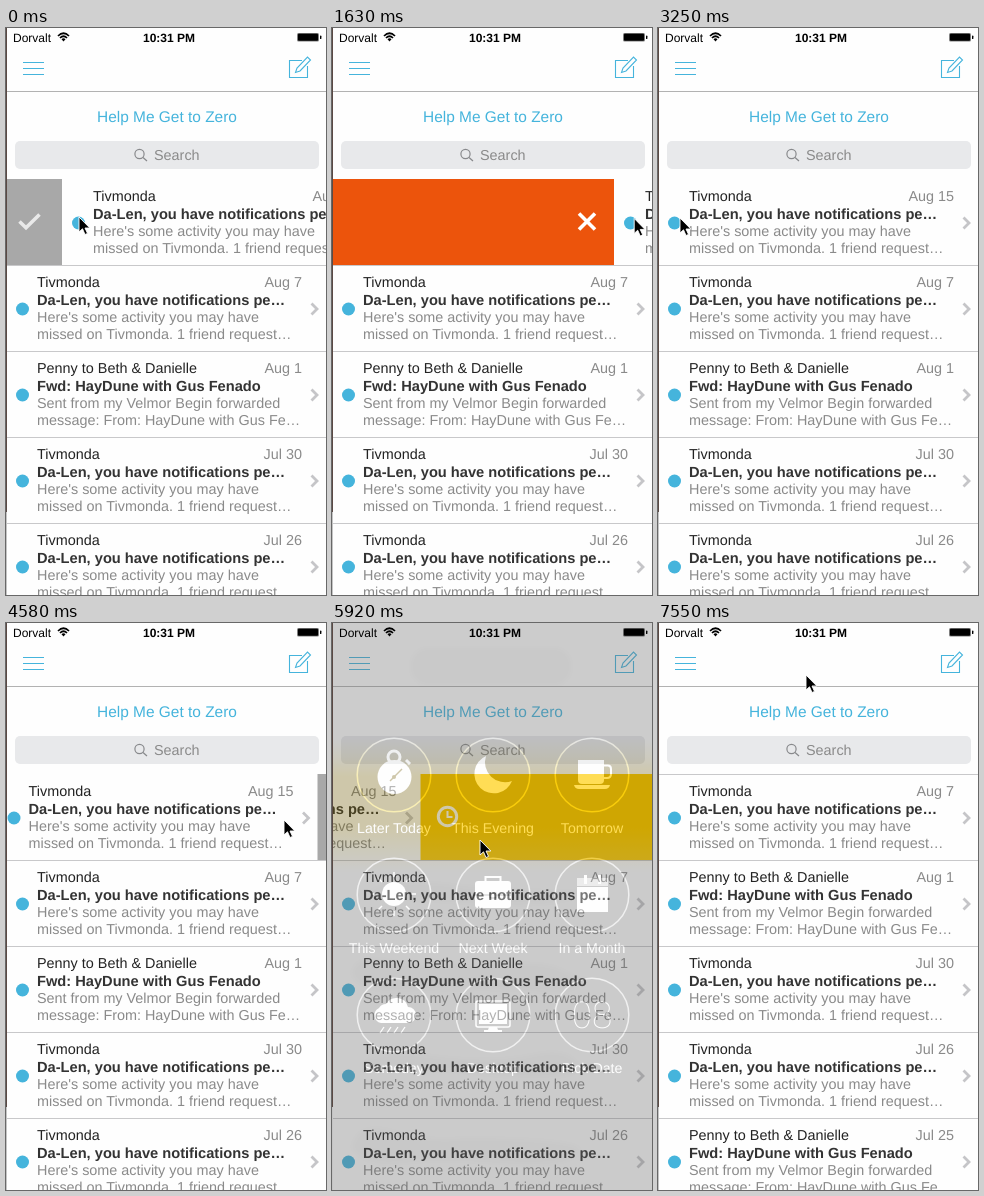
Recreate the animation shown at these times as an HTML page. Size 320 px wide and 567 px high, loop 8000 ms.

```html
<!DOCTYPE html>
<html lang="en">
<head>
<meta charset="utf-8">
<title>Swipe to sort mail</title>
<style>
  html, body { margin: 0; height: 100%; overflow: hidden; background: #fff; }
  svg { display: block; width: 100%; height: 100%; font: 14.4px "Liberation Sans", Arial, sans-serif; text-rendering: geometricPrecision; }
  .line { fill: none; stroke: #45b4dc; stroke-width: 1.1; }
  .subject { font-size: 14.65px; font-weight: bold; fill: #333; }
  .soft { fill: #8a8a8a; }
  .mid { text-anchor: middle; }
  .end { text-anchor: end; }
  .white { fill: none; stroke: #fff; }
  .menu text { font-size: 14.2px; fill: #fff; text-anchor: middle; }
  .menu .digits { font: 100 37px Roboto, sans-serif; }
</style>
</head>
<body>
<svg viewBox="0 0 320 567" preserveAspectRatio="none">
  <defs>
    <linearGradient id="blurredPage" x2="0" y2="1">
      <stop offset=".205" stop-color="#6b6b6b"/>
      <stop offset=".24" stop-color="#6d6640"/>
      <stop offset=".27" stop-color="#725d06"/>
      <stop offset=".36" stop-color="#725d06"/>
      <stop offset=".4" stop-color="#6c6438"/>
      <stop offset=".44" stop-color="#686868"/>
    </linearGradient>
    <linearGradient id="goldRing" gradientUnits="userSpaceOnUse" x1="0" x2="0" y1="115" y2="155">
      <stop stop-color="#e4e4e4"/><stop offset="1" stop-color="#efcf22"/>
    </linearGradient>
    <filter id="blur"><feGaussianBlur stdDeviation="2"/></filter>
  </defs>

  <rect width="320" height="567" fill="#fefefe"/>

  <g id="swipeRow">
    <rect id="panel" y="151" width="320" height="86"/>
    <g id="icon" class="white" stroke-width="3.6">
      <path id="check" d="M-10 0L-3.5 6.2L10-7"/>
      <path id="cross" d="M-8-8L8 8M8-8L-8 8"/>
      <g id="clock" stroke-width="3"><circle r="9.2"/><path d="M0-5.5V.5H5" stroke-width="2"/></g>
    </g>
    <g id="front"></g>
  </g>
  <g id="list"></g>

  <g id="header">
    <path d="M1 63.5H320" stroke="#b2b2b2"/>
    <path class="line" d="M17 34.5H38M17 40.5H38M17 46.5H38"/>
    <path class="line" d="M296 32.5H283.5V49.5H301.5V38M289.5 44.5L291 40L301.5 29L304.5 32L294 43Z"/>
    <text class="mid" x="161" y="94" font-size="15.45" fill="#45b4dc">Help Me Get to Zero</text>
    <rect x="9" y="113" width="304" height="28" rx="5" fill="#e8e9eb"/>
    <g fill="none" stroke="#88898c" stroke-width="1.2"><circle cx="133.5" cy="126" r="4.6"/><path d="M137 129.5L141 133"/></g>
    <text class="soft" x="148" y="132">Search</text>
  </g>

  <g id="overlay" class="menu">
    <rect width="320" height="567" x="1" fill="url(#blurredPage)"/>
    <g filter="url(#blur)" opacity=".08">
      <rect x="79" y="25" width="160" height="37" rx="17"/>
      <path d="M20 350Q24 330 60 338T140 343T205 341T250 358Q245 372 200 368T90 368T20 350Z"/>
      <path d="M30 443Q40 425 100 433T200 432T248 446Q230 460 160 452T30 443Z"/>
      <path d="M20 525Q25 498 60 508T120 516T200 517T247 530Q235 545 170 540T70 540T20 525Z"/>
      <path d="M35 270Q60 255 120 262T250 268Q240 284 160 281T35 270Z"/>
    </g>
    <g id="choices"></g>
    <g fill="#fff">
      <circle cx="62.5" cy="154" r="17"/>
      <circle cx="62" cy="134" r="6" class="white" stroke-width="3"/>
      <path d="M74 137L78 141" class="white" stroke-width="3"/>
      <path d="M58 158L70 146" stroke="#725d06" stroke-width="1.5"/>
      <circle cx="62" cy="154" r="2" fill="#725d06"/>

      <path d="M154 133A19.5 19.5 0 1 0 180 158A20 20 0 0 1 154 133Z"/>

      <path d="M246 137H272V157Q272 161 268 161H250Q246 161 246 157ZM242 162H278Q277 166 273 166H247Q243 166 242 162Z"/>
      <path d="M272 142.5H276Q279 142.5 279 146V151Q279 155 275 155H271" class="white" stroke-width="2"/>

      <circle cx="62" cy="271" r="12"/>
      <g id="rays" stroke="#fff" stroke-width="1.5"></g>

      <rect x="143" y="258" width="36" height="27" rx="3"/>
      <path d="M153.5 258V254H168.5V258" class="white" stroke-width="2"/>
      <path d="M143 272H179" stroke="#686868"/><rect x="158" y="270" width="6" height="5" stroke="#686868"/>

      <rect x="245" y="255" width="31" height="8" opacity=".65"/><rect x="245" y="264" width="31" height="25"/>
      <path d="M253.5 252V261M267.5 252V261" class="white" stroke-width="3"/>

      <path d="M49 400A8 8 0 0 1 47 385A8 8 0 0 1 54 381A12 12 0 0 1 76 384A8 8 0 0 1 76 400Z"/>
      <path d="M52 404L48 410M59 404L55 410M66 404L62 410M73 404L69 410" class="white" stroke-width="1.3"/>

      <rect x="144" y="378" width="34" height="26" rx="2" class="white" stroke-width="1.5"/>
      <rect x="147" y="381" width="28" height="20"/>
      <path d="M157 404H165L166 407H170V409H152V407H156Z"/>
      <text class="digits" x="260" y="405">08</text>
    </g>
  </g>

  <g id="statusBar">
    <text x="7" y="13.5" font-size="12">Dorvalt</text>
    <text class="mid" x="163" y="13.5" font-size="12" font-weight="bold">10:31 PM</text>
    <path d="M52 8Q57.5 2.5 63 8M54 10Q57.5 6.5 61 10" fill="none" stroke="#000" stroke-width="1.7"/>
    <path d="M55.5 11.2Q57.5 9.5 59.5 11.2L57.5 13.5Z"/>
    <rect x="291" y="5" width="22" height="8.5" rx="1.5" opacity=".5"/>
    <rect x="292" y="5.8" width="20" height="7" rx=".8"/><rect x="314" y="7.5" width="1.4" height="3.6" rx=".7"/>
  </g>
  <path d="M.5 0V484" stroke="#5b4a45"/><path d="M.5 484V567" stroke="#c4c4c4"/>
  <path id="cursor" d="M0 0V15L3.5 11.8L6 17.5L8.5 16.4L6 11H10.8Z" stroke="#fff" stroke-width=".9"/>
</svg>

<script>
const $ = id => document.getElementById(id);
const ROW_TOP = 151, ROW_HEIGHT = 86, LOOP = 8000, TICKS = 54;

const activity = ["Tivmonda", "Da-Len, you have notifications pe…",
  "Here's some activity you may have", "missed on Tivmonda. 1 friend request…"];
const forward = ["Penny to Beth & Danielle", "Fwd: HayDune with Gus Fenado",
  "Sent from my Velmor Begin forwarded", "message: From: HayDune with Gus Fe…"];
const mails = [["Aug 15", activity], ["Aug 7", activity], ["Aug 1", forward],
  ["Jul 30", activity], ["Jul 26", activity], ["Jul 25", forward]];

// The row that is swiped has no line above it.
function mailRow([date, [sender, subject, first, second]], index) {
  return `<g transform="translate(0 ${ROW_TOP + index * ROW_HEIGHT})">
    <rect width="320" height="${ROW_HEIGHT}" fill="#fefefe"/>
    ${index ? '<path d="M1 .5H320" stroke="#c8c8ca"/>' : ""}
    <circle cx="16.5" cy="44" r="6.5" fill="#45b4dc"/>
    <path d="M305.5 38.5L311 44L305.5 49.5" fill="none" stroke="#c5c5c8" stroke-width="2.8"/>
    <text x="31" y="22" fill="#222">${sender.replace("&", "&amp;")}</text>
    <text class="soft end" x="296" y="22">${date}</text>
    <text class="subject" x="31" y="39.5">${subject}</text>
    <text class="soft" x="31" y="57">${first}</text>
    <text class="soft" x="31" y="74">${second}</text>
  </g>`;
}
const rows = mails.map(mailRow);
$("front").innerHTML = rows[0];
$("list").innerHTML = rows.slice(1).join("");

$("choices").innerHTML = ["Later Today", "This Evening", "Tomorrow", "This Weekend", "Next Week",
  "In a Month", "Someday", "Desktop", "Pick Date"].map((label, i) => {
  const x = 62 + i % 3 * 99, y = 152 + Math.floor(i / 3) * 120;
  return `<circle cx="${x}" cy="${y}" r="36.8" fill="none" stroke-width="1.5"
    stroke="${i < 3 ? "url(#goldRing)" : "#d6d6d6"}"/><text x="${x}" y="${y + 58}">${label}</text>`;
}).join("");
$("rays").innerHTML = [...Array(8).keys()].map(i =>
  `<path d="M79 271H84" transform="rotate(${i * 45} 62 271)"/>`).join("");

// Tracks are [tick, value] pairs, joined by straight lines.
const tracks = {
  swipe: [[1, 56], [7, 258], [12, 288], [14, 288], [17, 171.5], [22, 0], [30, 0], [31, -8.5], [38, -143], [39, -143], [41, -320]],
  cursorX: [[1, 73], [7, 279], [12, 308], [14, 308], [17, 170], [22, 22], [27, 286], [30, 286], [31, 278], [38, 148]],
  cursorY: [[1, 189], [7, 191], [14, 190], [17, 184], [22, 190], [27, 197], [31, 197], [38, 217], [47, 217], [51, 52]],
  green: [[1, 0], [3, 1], [19, 1], [21, 0]],
  red: [[8, 0], [10, 1], [15, 1], [17, .42], [18, 0]],
  yellow: [[33, 0], [36, 1]],
  menu: [[39, 0], [42, 1], [47, 1], [50, 0]],
  collapse: [[48, 0], [51, 1]]
};
function valueAt(track, tick) {
  const next = track.findIndex(([at]) => at > tick);
  if (next < 0) return track[track.length - 1][1];
  if (next === 0) return track[0][1];
  const [t0, a] = track[next - 1], [t1, b] = track[next];
  return a + (b - a) * (tick - t0) / (t1 - t0);
}
const mix = (from, to, amount) => from.map((c, i) => c + (to[i] - c) * amount);
const GRAY = [168, 168, 168], GREEN = [80, 216, 72], RED = [236, 84, 12], YELLOW = [255, 204, 0];

function draw(time) {
  const tick = Math.min(TICKS - 1, Math.floor((time % LOOP + 20) * TICKS / LOOP));
  const now = {};
  for (const name in tracks) now[name] = valueAt(tracks[name], tick);

  const { swipe } = now, reach = Math.abs(swipe), right = swipe > 0;
  const inset = reach > 60 ? reach - 27 : 23.5;
  const color = right ? mix(mix(GRAY, GREEN, now.green), RED, now.red) : mix(GRAY, YELLOW, now.yellow);
  $("panel").setAttribute("fill", `rgb(${color.map(Math.round)})`);
  $("icon").setAttribute("transform", `translate(${right ? inset : 320 - inset} 193.5)`);
  $("icon").setAttribute("opacity", Math.min(1, reach / 75));
  const shown = !right ? "clock" : now.red > .5 ? "cross" : "check";
  for (const id of ["check", "cross", "clock"])
    $(id).setAttribute("visibility", id === shown ? "visible" : "hidden");

  $("front").setAttribute("transform", `translate(${swipe} 0)`);
  $("list").setAttribute("transform", `translate(0 ${-ROW_HEIGHT * now.collapse})`);
  $("overlay").setAttribute("opacity", now.menu);
  $("cursor").setAttribute("transform", `translate(${now.cursorX} ${now.cursorY})`);
}

const start = performance.now();
function frame() {
  draw(performance.now() - start);
  requestAnimationFrame(frame);
}
frame();
</script>
</body>
</html>
```
